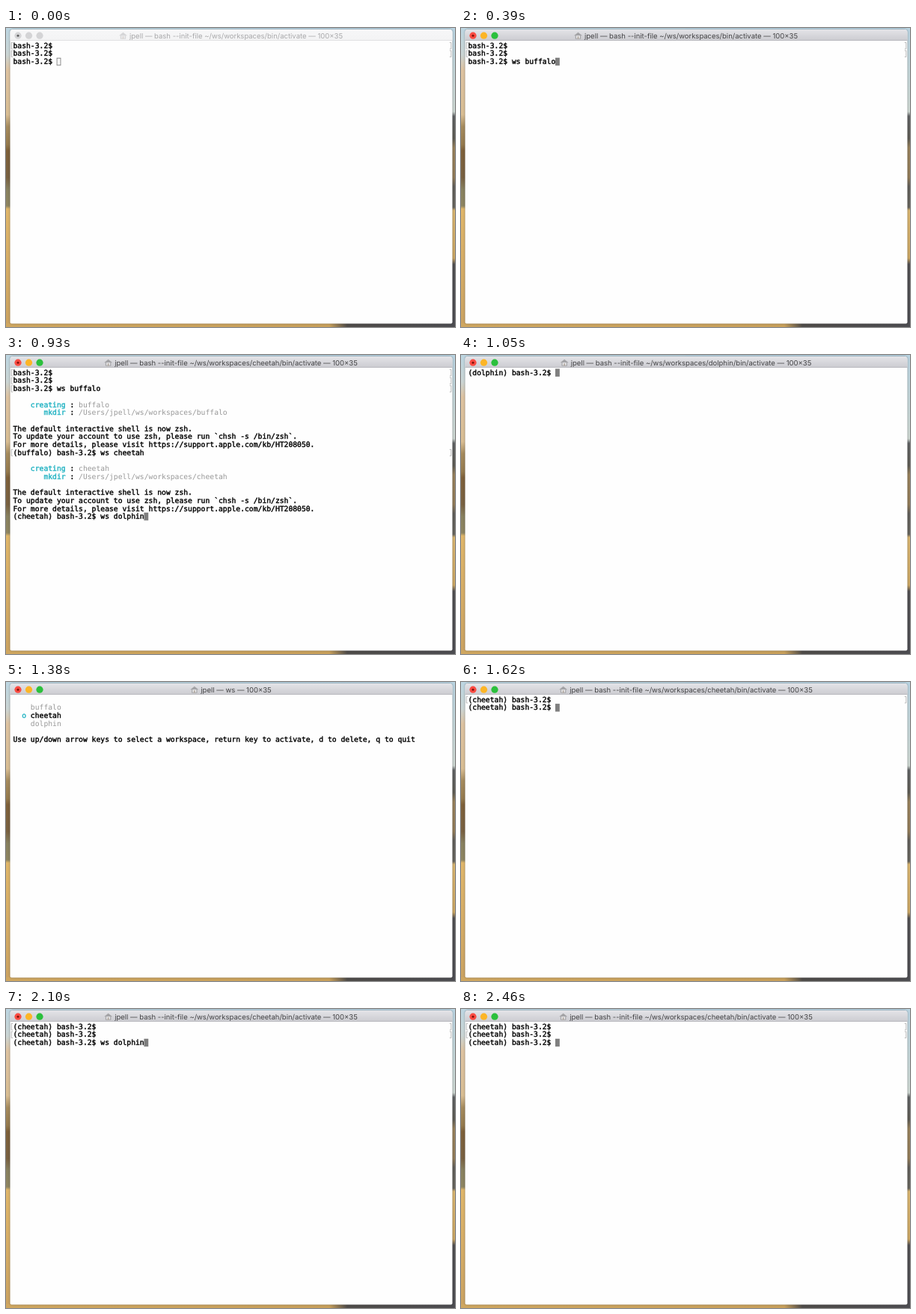
An HTML page with a canvas for the animation above (2.49 s loop, 600 by 400 pixels).

```html
<!DOCTYPE html>
<html lang="en">
<head>
<meta charset="utf-8">
<title>Workspace switcher</title>
<style>
  html, body { margin: 0; width: 100%; height: 100%; overflow: hidden; }
  canvas { display: block; width: 600px; height: 400px; }
</style>
</head>
<body>
<canvas id="stage" width="600" height="400"></canvas>
<script>
const ctx = document.getElementById('stage').getContext('2d');
const LOOP = 2490, STEP = 30;
const CELL = 5.84, ROW = 10.69, LEFT = 9.5, BASE = 26.8;
const INK = '#000', GREY = '#989898', CYAN = '#20b2c2', CURSOR = '#7f7f7f';
const USER = 'jpell';
const SPACES = ['buffalo', 'cheetah', 'dolphin'];

// Terminal content: a line is a list of [column, text, colour] plus a prompt mark.
const line = (...parts) => ({ parts, mark: false });
const text = s => line([0, s, INK]);
const entered = s => ({ parts: [[0, s, INK]], mark: true });
const prompt = name => (name ? `(${name}) ` : '') + 'bash-3.2$ ';
const shellTitle = name => `bash --init-file ~/ws/workspaces/${name ? name + '/' : ''}bin/activate`;

const notice = [
  line(),
  text('The default interactive shell is now zsh.'),
  text('To update your account to use zsh, please run `chsh -s /bin/zsh`.'),
  text('For more details, please visit https://support.apple.com/kb/HT208050.')
];
const created = name => [
  line(),
  line([4, 'creating', CYAN], [13, ':', INK], [15, name, GREY]),
  line([7, 'mkdir', CYAN], [13, ':', INK], [15, `/Users/${USER}/ws/workspaces/${name}`, GREY]),
  ...notice
];

function typed(s, t, from, to) {
  const k = Math.min(1, Math.max(0, (t - from) / (to - from)));
  return s.slice(0, Math.round(s.length * k));
}

function shell(name, history, input, focus = true) {
  const s = prompt(name) + input;
  return { title: shellTitle(name), lines: [...history, text(s)], cursor: s.length, focus };
}

function menu(selected) {
  const items = SPACES.map((name, i) => i === selected
    ? line([2, 'o', CYAN], [4, name, INK])
    : line([4, name, GREY]));
  const help = 'Use up/down arrow keys to select a workspace, return key to activate, d to delete, q to quit';
  return { title: 'ws', lines: [line(), ...items, line(), text(help)], cursor: -1, focus: true };
}

function lastInput(t) {
  if (t < 1860) return typed('ws ', t, 1740, 1830);
  if (t < 2100) return 'ws ' + SPACES[Math.floor((t - 1860) / 80)];
  return 'ws dolphin'.slice(0, 10 - typed('ws dolphin', t, 2100, 2310).length);
}

function scene(t) {
  const [first, second, third] = SPACES;
  const log = [entered(prompt()), entered(prompt())];
  if (t < 420) return shell('', log, typed('ws buffalo', t, 90, 390), t >= 60);
  log.push(entered(prompt() + 'ws ' + first), ...created(first));
  if (t < 690) return shell(first, log, typed('ws cheetah', t, 420, 660));
  log.push(entered(prompt(first) + 'ws ' + second), ...created(second));
  if (t < 960) return shell(second, log, typed('ws dolphin', t, 690, 930));
  log.push(entered(prompt(second) + 'ws ' + third), ...created(third));
  if (t < 1020) return shell(third, log, '');
  if (t < 1170) return shell(third, [], typed('ws', t, 1080, 1140));
  if (t < 1470) return menu([0, 1, 2, 1, 1][Math.floor((t - 1170) / 60)]);
  if (t < 1560) return shell(second, [entered(prompt(third) + 'ws'), ...notice], '');
  const blanks = (t >= 1620) + (t >= 1680);
  return shell(second, Array(blanks).fill(entered(prompt(second))), lastInput(t));
}

// Painting
function gradient(x0, y0, x1, y1, ...stops) {
  const g = ctx.createLinearGradient(x0, y0, x1, y1);
  stops.forEach(([at, colour]) => g.addColorStop(at, colour));
  return g;
}

function rect(x, y, w, h, fill) {
  ctx.fillStyle = fill;
  ctx.fillRect(x, y, w, h);
}

function roundRect(x, y, w, h, radii, fill) {
  ctx.beginPath();
  ctx.roundRect(x, y, w, h, radii);
  ctx.fillStyle = fill;
  ctx.fill();
}

function dot(x, y, r, fill) {
  ctx.beginPath();
  ctx.arc(x, y, r, 0, 7);
  ctx.fillStyle = fill;
  ctx.fill();
}

function drawDesktop() {
  rect(0, 0, 300, 400, gradient(0, 0, 0, 400,
    [0, '#bcd6e2'], [.09, '#cbd5d4'], [.14, '#dec3a0'], [.29, '#d9bd92'], [.33, '#a58a5c'],
    [.39, '#94794c'], [.41, '#7d5f38'], [.5, '#786040'], [.54, '#87805e'], [.595, '#8d8460'],
    [.605, '#e0b669'], [1, '#cba260']));
  rect(300, 0, 300, 400, gradient(0, 0, 0, 400,
    [0, '#b9d4e2'], [.28, '#ced8d2'], [.295, '#5e6062'], [.37, '#5c5a52'], [.4, '#97805a'],
    [.5, '#917a56'], [.53, '#5f5d58'], [.6, '#65635c'], [.61, '#dab56f'], [.77, '#cba662'],
    [.79, '#4f4e50'], [1, '#4b4b50']));
  rect(0, 395, 600, 5, gradient(0, 0, 600, 0,
    [0, '#d0a75f'], [.72, '#c9a05a'], [.76, '#4e4b48'], [1, '#4c4c50']));
}

function drawHouse(x, y, focus) {
  ctx.fillStyle = focus ? '#a3a3a6' : '#d6d6d8';
  ctx.beginPath();
  ctx.moveTo(x - 5.5, y);
  ctx.lineTo(x, y - 4.5);
  ctx.lineTo(x + 5.5, y);
  ctx.fill();
  ctx.fillRect(x - 3.7, y, 7.4, 4.5);
  rect(x - 2.5, y, 5, 3.6, '#ececee');
  rect(x - 1, y + 1, 2, 3.5, focus ? '#b4aca4' : '#dcd8d4');
}

function drawFrame(title, focus) {
  ctx.shadowColor = 'rgba(30,30,35,.45)';
  ctx.shadowBlur = 3;
  roundRect(5.5, 2, 591, 393.5, [4, 4, 2, 2], '#fefefe');
  ctx.shadowBlur = 0;
  const bar = focus ? [[0, '#e4e4e8'], [1, '#cbcbd0']] : [[0, '#f7f7f8'], [1, '#f3f3f4']];
  roundRect(5.5, 2, 591, 15, [4, 4, 0, 0], gradient(0, 2, 0, 17, ...bar));
  rect(5.5, 16.4, 591, .6, focus ? '#aeaeb2' : '#d6d6d8');

  const lights = focus ? ['#fa4b42', '#fcb526', '#2bc03c'] : Array(3).fill('#d4d4d6');
  lights.forEach((colour, i) => dot(16 + 14.5 * i, 10.2, 4.6, colour));
  dot(16, 10.2, 1.5, focus ? '#7c130b' : '#5c5c5e');

  const caption = `${USER} — ${title} — 100×35`;
  ctx.font = '9.5px Inter, sans-serif';
  ctx.textAlign = 'center';
  ctx.fillStyle = focus ? '#434345' : '#a8a8aa';
  ctx.fillText(caption, 307.5, 13.6);
  drawHouse(307.5 - ctx.measureText(caption).width / 2 - 8.5, 10.2, focus);
}

function drawBracket(x, y, side) {
  ctx.beginPath();
  ctx.moveTo(x + side * 2, y);
  ctx.lineTo(x, y);
  ctx.lineTo(x, y + 8.5);
  ctx.lineTo(x + side * 2, y + 8.5);
  ctx.strokeStyle = '#a9a9a9';
  ctx.lineWidth = .8;
  ctx.stroke();
}

function drawText([col, s, colour], y) {
  ctx.fillStyle = ctx.strokeStyle = colour;
  ctx.lineWidth = .4;
  [...s].forEach((ch, i) => {
    const x = LEFT + (col + i) * CELL;
    ctx.fillText(ch, x, y);
    if (colour !== GREY) ctx.strokeText(ch, x, y);
  });
}

function drawTerminal({ lines, cursor, focus }) {
  ctx.font = '9.7px "DejaVu Sans Mono", monospace';
  ctx.textAlign = 'left';
  lines.forEach(({ parts, mark }, i) => {
    const y = BASE + i * ROW;
    if (mark) {
      drawBracket(7.2, y - 7.3, 1);
      drawBracket(594.8, y - 7.3, -1);
    }
    parts.forEach(part => drawText(part, y));
  });
  if (cursor < 0) return;
  const x = LEFT + cursor * CELL - .3, y = BASE + (lines.length - 1) * ROW - 8.4;
  if (focus) return rect(x, y, CELL, 10.5, CURSOR);
  ctx.strokeStyle = CURSOR;
  ctx.lineWidth = .9;
  ctx.strokeRect(x + .5, y + .5, CELL - 1, 9.5);
}

function draw(now) {
  const t = Math.floor((now % LOOP) / STEP) * STEP;
  const view = scene(t);
  ctx.textRendering = 'geometricPrecision';
  drawDesktop();
  drawFrame(view.title, view.focus);
  drawTerminal(view);
}

const start = performance.now();
function tick() {
  draw(performance.now() - start);
  requestAnimationFrame(tick);
}
tick();
</script>
</body>
</html>
```
